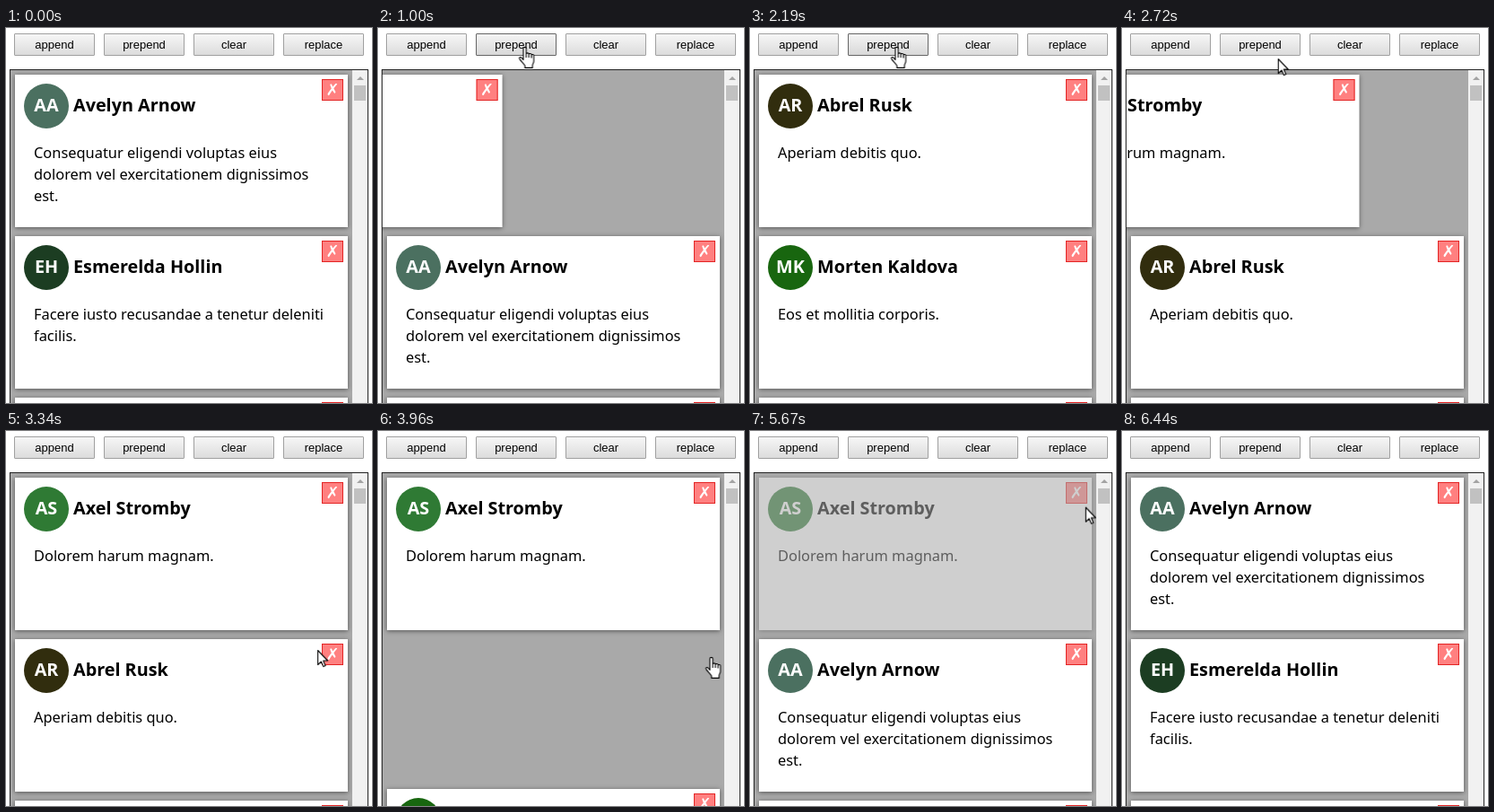
These frames come from a looping animation (408x418 px, 6910 ms). An HTML page:

```html
<!DOCTYPE html>
<html lang="en">
<head>
<meta charset="utf-8">
<title>Animated card list</title>
<style>
  html, body { margin: 0; width: 100%; height: 100%; overflow: hidden; background: #fff; }
  .stage { position: relative; width: 408px; height: 418px; overflow: hidden; font-family: "Noto Sans", "Open Sans", sans-serif; color: #000; }

  .tool {
    position: absolute; top: 6px; box-sizing: border-box; width: 90px; height: 25px;
    border: 1px solid #a0a0a0; border-radius: 1px;
    background-image: linear-gradient(#f6f6f6, #ececec 40%, #dcdcdc);
    font: 13px/23px "Liberation Sans", Arial, sans-serif; text-align: center;
  }

  .list {
    position: absolute; left: 4px; top: 46px; box-sizing: border-box; width: 400px; height: 400px;
    border: 1px solid #222; background: #a9a9a9;
  }
  .view { position: absolute; inset: 0 17px 0 0; padding: 5px; overflow: hidden; }
  .bar { position: absolute; right: 0; top: 0; width: 17px; height: 100%; background: #f1f1f1; }
  .bar::before {
    content: ""; position: absolute; left: 5px; top: 7px;
    border: solid transparent; border-width: 0 4px 4px; border-bottom-color: #a3a3a3;
  }
  .bar::after { content: ""; position: absolute; left: 2px; top: 17px; width: 13px; height: 17px; background: #c1c1c1; }

  .item { height: 180px; }
  .card {
    position: relative; width: 371px; height: 170px; background: #fff;
    box-shadow: 0 1px 5px rgba(0, 0, 0, .5);
  }
  .card > * { position: absolute; margin: 0; }
  .badge {
    left: 10px; top: 10px; width: 50px; height: 50px; border-radius: 50%;
    color: #fff; font-weight: 700; font-size: 19.8px; line-height: 48px; text-align: center;
  }
  h2 { left: 65px; top: 21px; font-size: 19.8px; line-height: 25px; white-space: nowrap; }
  p { left: 21px; top: 75px; font-size: 16.4px; line-height: 24px; white-space: nowrap; }
  .close {
    right: 5px; top: 5px; box-sizing: border-box; width: 24px; height: 24px;
    border: 1px solid #e32424; background: #ff8080; color: #fff;
    font: bold 18px/22px "DejaVu Sans", sans-serif; text-align: center;
  }

  .cursor { position: absolute; left: 0; top: 0; width: 24px; height: 28px; overflow: visible; }
  .cursor path { fill: #fff; stroke: #000; stroke-width: 1.1; stroke-linejoin: round; }
</style>
</head>
<body>
<div class="stage">
  <div class="tool" style="left:9px">append</div>
  <div class="tool" id="prepend" style="left:109px">prepend</div>
  <div class="tool" style="left:209px">clear</div>
  <div class="tool" style="left:309px">replace</div>
  <div class="list">
    <div class="view" id="view"></div>
    <div class="bar"></div>
  </div>
  <svg class="cursor" id="cursor">
    <path id="arrow" d="M.5.5V16.5L4.2 13 6.7 18.6 9 17.6 6.6 12H11.5Z"/>
    <path id="hand" transform="translate(-6.5)" d="M5 14.5V2a1.6 1.6 0 0 1 3.2 0V8.2a1.5 1.5 0 0 1 3 .3 1.5 1.5 0 0 1 2.9.7 1.4 1.4 0 0 1 2.6.9V16c0 2-1.5 3-1.5 5v2.4H6.8V21C5.5 18.5 2.7 16.5.9 13.6c-1-1.8 1-2.7 2.1-1.5ZM8.2 8v4M11.2 8.6V12M14.1 9.3V12.4"/>
  </svg>
</div>
<script>
const LOOP = 6910, SLIDE = 400, FADE = 300, CLOSE = 350;

// "added" and "removed" are times in ms; cards without them stay for good.
const people = [
  { name: "Axel Stromby", color: "#2f7a34", text: "Dolorem harum magnam.", added: 2560, removed: 5505 },
  { name: "Abrel Rusk", color: "#312d0e", text: "Aperiam debitis quo.", added: 1750, removed: 3632 },
  { name: "Morten Kaldova", color: "#18660f", text: "Eos et mollitia corporis.", added: 912, removed: 4604 },
  { name: "Avelyn Arnow", color: "#4b7060", text: "Consequatur eligendi voluptas eius<br>dolorem vel exercitationem dignissimos<br>est." },
  { name: "Esmerelda Hollin", color: "#1c3d22", text: "Facere iusto recusandae a tenetur deleniti<br>facilis." },
  { name: "", color: "#fff", text: "" }
];

const byId = id => document.getElementById(id);
const sheet = document.head.appendChild(document.createElement("style"));
let count = 0;

// Turns stops of [ms, css, easing to the next stop] into a looping CSS animation.
function track(el, stops) {
  const name = "track" + count++;
  const last = stops[stops.length - 1];
  const rules = [...stops, [LOOP, last[1]]].map(([ms, css, ease = "step-end"]) =>
    `${(ms / LOOP * 100).toFixed(4)}%{${css};animation-timing-function:${ease}}`);
  sheet.append(`@keyframes ${name}{${rules.join("")}}`);
  el.style.animation = `${name} ${LOOP}ms infinite`;
}

function addCard({ name, color, text, added, removed }) {
  const initials = name.split(" ").map(word => word[0]).join("");
  const item = document.createElement("div");
  item.className = "item";
  item.innerHTML = `<div class="card"><div class="badge" style="background:${color}">${initials}</div>
    <h2>${name}</h2><p>${text}</p><div class="close">✗</div></div>`;
  byId("view").append(item);
  if (!added) return;

  const gone = removed + FADE;
  const look = (opacity, x) => `opacity:${opacity};transform:translateX(${x}px)`;
  track(item, [
    [0, "height:0"],
    [added, "height:180px"],
    [gone, "height:180px", "ease"],
    [gone + CLOSE, "height:0"]
  ]);
  track(item.firstChild, [
    [0, look(0, -371)],
    [added, look(1, -371), "ease"],
    [added + SLIDE, look(1, 0)],
    [removed, look(1, 0), "linear"],
    [gone, look(0, 0)]
  ]);
}
people.forEach(addCard);

const face = (border, ...colors) => `border-color:${border};background-image:linear-gradient(${colors})`;
const rest = face("#a0a0a0", "#f6f6f6", "#ececec 40%", "#dcdcdc");
const hover = face("#666", "#f4f4f4", "#e9e9e9 40%", "#d8d8d8");
const press = face("#666", "#d4d4d4", "#e4e4e4 40%", "#eee");
track(byId("prepend"), [
  [0, rest], [510, hover],
  [740, press], [900, hover],
  [1530, press], [1740, hover],
  [2400, press], [2550, hover],
  [2710, rest]
]);

const at = (x, y) => `transform:translate(${x}px,${y}px)`;
track(byId("cursor"), [
  [0, at(-40, 253)],
  [69, at(245, 253), "ease-in-out"],
  [590, at(163.5, 21)],
  [2640, at(163.5, 21), "ease-in-out"],
  [3110, at(333, 239), "linear"],
  [3340, at(347, 244), "linear"],
  [3490, at(371.5, 252)],
  [4380, at(371.5, 252), "linear"],
  [4560, at(369, 250)],
  [4650, at(369, 250), "ease-in"],
  [4880, at(375, 161), "linear"],
  [4960, at(379, 130), "linear"],
  [5110, at(372, 81), "ease-out"],
  [5330, at(372, 64)],
  [5600, at(372, 64), "ease-in"],
  [5850, at(387, 240), "linear"],
  [6110, at(387, 430)],
  [6275, at(396, 400), "linear"],
  [6350, at(395, 379), "linear"],
  [6435, at(412, 379)]
]);

const show = on => `visibility:${on ? "visible" : "hidden"}`;
const handTimes = [[510, 2710], [3410, 4720], [5150, 5660]];
const shape = (el, isHand) => track(el, [
  [0, show(!isHand)],
  ...handTimes.flatMap(([from, to]) => [[from, show(isHand)], [to, show(!isHand)]])
]);
shape(byId("hand"), true);
shape(byId("arrow"), false);
</script>
</body>
</html>
```
